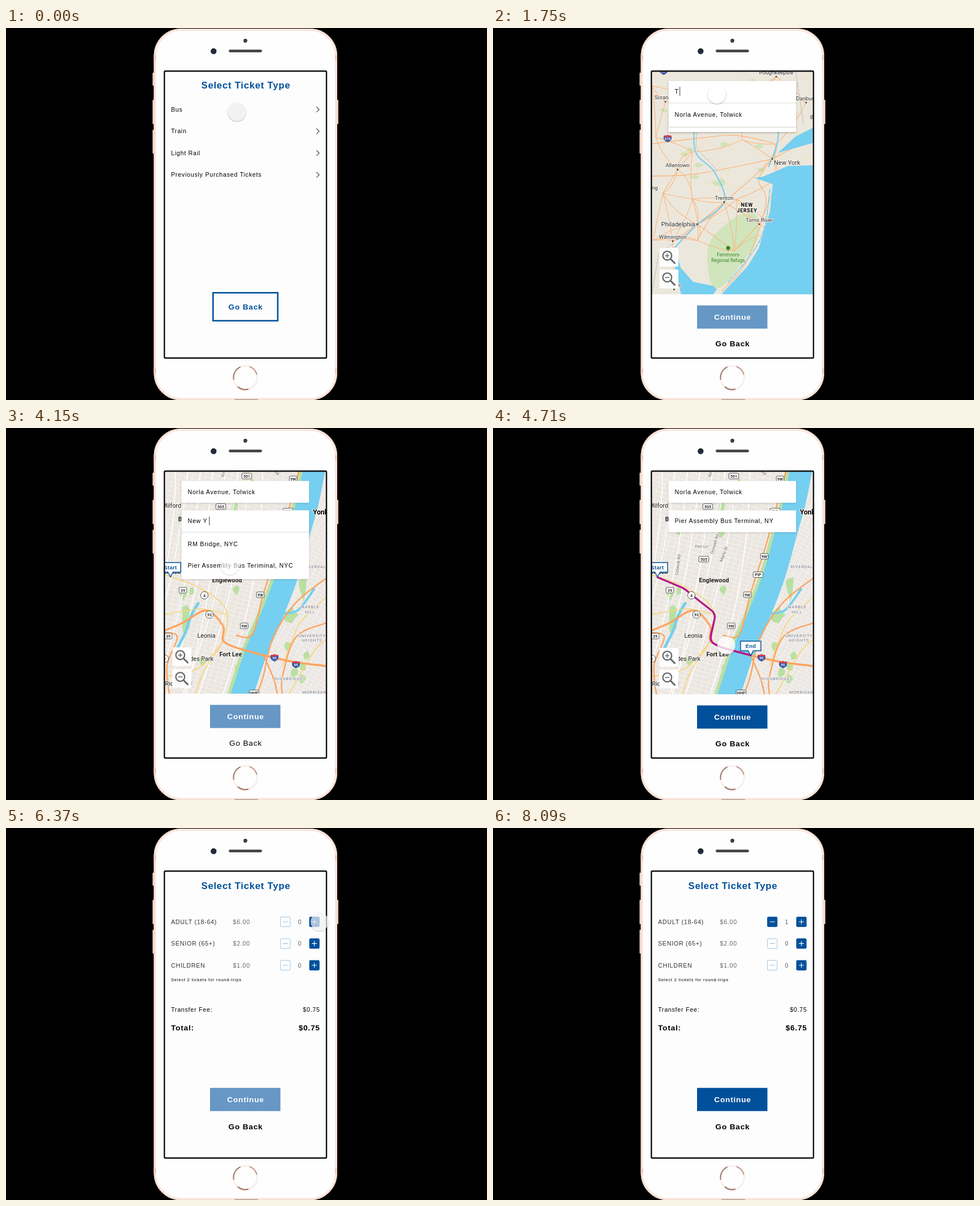
Recreate the animation shown at these times as an HTML page. Size 851 by 658 pixels, loop 8.84 s.

```html
<!DOCTYPE html>
<html lang="en">
<head>
<meta charset="utf-8">
<title>Ticket app</title>
<style>
html, body { margin: 0; height: 100%; overflow: hidden; background: #000; }
svg { display: block; width: 851px; height: 658px; }
text { font-family: "Liberation Sans", Arial, sans-serif; letter-spacing: .76px; white-space: pre; }
.b { font-weight: 700; }
.m { text-anchor: middle; }
.e { text-anchor: end; }
.map text { font-family: Roboto, "Open Sans", sans-serif; letter-spacing: 0; }
.map .halo { paint-order: stroke; stroke: #f6f3ee; stroke-width: 2px; stroke-linejoin: round; }
.map .wide { letter-spacing: .8px; }
.map .ui { font-family: "Liberation Sans", Arial, sans-serif; letter-spacing: .4px; }
.line { fill: none; stroke-linejoin: round; stroke-linecap: round; }
</style>
</head>
<body>
<svg id="stage" viewBox="0 0 851 658"></svg>
<script>
const BLUE = '#00509b', PALE = '#6697c5', WATER = '#75cff0', WHITE = '#fdfdfd', PARK = '#b9e0a2';
const ADDRESS = 'Norla Avenue, Tolwick';

// ---- drawing helpers; text is placed by its vertical centre ----
const text = (x, y, s, size = 10.65, attrs = '') =>
  `<text x="${x}" y="${y + size * .36}" font-size="${size}" ${attrs}>${s}</text>`;
const label = (x, y, s, size = 10, attrs = '', cls = 'm') =>
  text(x, y, s, size, `class="halo ${cls}" ${attrs}`);
const rect = (x, y, w, h, fill, attrs = '') =>
  `<rect x="${x}" y="${y}" width="${w}" height="${h}" fill="${fill}" ${attrs}/>`;
const line = (d, color, width = 1, attrs = '') =>
  `<path class="line" d="${d}" stroke="${color}" stroke-width="${width}" ${attrs}/>`;
const area = (d, fill) => `<path d="${d}Z" fill="${fill}"/>`;
const dot = (x, y, r = 1.3, fill = '#222') => `<circle cx="${x}" cy="${y}" r="${r}" fill="${fill}"/>`;
const group = (id, body, attrs = '') => `<g id="${id}" ${attrs}>${body}</g>`;
const shift = (x, body) => `<g transform="translate(${x})">${body}</g>`;
const title = y => text(424.4, y, 'Select Ticket Type', 16.7, `class="b m" fill="${BLUE}"`);
const goBack = (y, cls = 'b', fill = '#000') => text(424, y, 'Go Back', 13.7, `class="m ${cls}" fill="${fill}"`);
const button = (y, fill) => rect(361, y - 20.5, 124.5, 41, fill) +
  text(424, y, 'Continue', 13.7, 'class="b m" fill="#fff"');
const field = (y, h = 38.5) => rect(310.7, y, 225.4, h, '#fff', 'filter="url(#soft)"');
const cursor = (x, y) => rect(x, y - 8, 1.5, 16, '#777');
const page = body => rect(281, 77, 286, 507, WHITE) + body;

function rng(seed) {
  return () => (seed = (seed * 16807) % 2147483647) / 2147483647;
}

// Smooth curve through a few "x y" points.
function curve(s) {
  const n = s.match(/[\d.]+/g).map(Number);
  const p = n.filter((_, i) => i % 2 === 0).map((x, i) => [x, n[i * 2 + 1]]);
  const at = i => p[Math.max(0, Math.min(p.length - 1, i))];
  const handle = (i, j, k) => at(i).map((v, c) => v + (at(j)[c] - at(k)[c]) / 6);
  return p.slice(1).reduce((d, q, i) =>
    `${d}C${handle(i, i + 1, i - 1)} ${handle(i + 1, i, i + 2)} ${q}`, `M${p[0]}`);
}

// Ragged patch of woodland.
function blob(rand, x, y, rx, ry) {
  let d = '';
  for (let a = 0; a < 6.2; a += .7) {
    const k = .6 + rand() * .6;
    d += `${d ? 'L' : 'M'}${x + Math.cos(a) * rx * k} ${y + Math.sin(a) * ry * k}`;
  }
  return d + 'Z';
}

function zoom(y, plus) {
  return rect(294.5, y, 33.5, 33, '#fff', 'opacity=".95"') +
    `<circle cx="308.3" cy="${y + 13.7}" r="7.8" fill="none" stroke="#666" stroke-width="2.3"/>` +
    line(`M314.5 ${y + 20}l7 7`, '#666', 3) +
    line(`M305 ${y + 13.7}h6.6` + (plus ? 'm-3.3 -3.3v6.6' : ''), '#666', 1.4);
}
const controls = (dy, fill, cls) => rect(281, 470 + dy, 286, 114 - dy, WHITE) +
  zoom(388 + dy, true) + zoom(426.5 + dy) + button(510.2 + dy, fill) + goBack(557 + dy, cls);

// ---- road signs ----
const signText = (x, y, s, size = 7, fill = '#333') =>
  text(x, y, s, size, `class="m" font-weight="700" fill="${fill}"`);
const sign = (x, y, s) => {
  const w = 6 + s.length * 3.8;
  return rect(x - w / 2, y - 5, w, 10, '#fff', 'rx="2" stroke="#444" stroke-width=".9"') + signText(x, y, s);
};
const ring = (x, y, s) =>
  `<circle cx="${x}" cy="${y}" r="6.6" fill="#fff" stroke="#444" stroke-width=".9"/>` + signText(x, y, s);
const highway = (x, y, s) => `<g transform="translate(${x} ${y})">` +
  area('M-6 -5Q-3 -4 0 -6Q3 -4 6 -5Q10 3 0 7Q-10 3 -6 -5', '#3f56a8') +
  area('M-6 -5Q-3 -4 0 -6Q3 -4 6 -5L7 -2H-7', '#d8404a') + signText(0, 1, s, 6, '#fff') + '</g>';
const flag = (x, y, s) =>
  `<path d="M${x - 18} ${y - 26}h36v17h-13.5l-4.5 8.5l-4.5 -8.5h-13.5Z" fill="#fff" stroke="${BLUE}" stroke-width="1.5"/>` +
  text(x, y - 17.5, s, 9.2, `class="b m ui" fill="${BLUE}"`);

// ---- maps ----
function stateMap() {
  const rand = rng(71);
  // Each town: its dot, its name and the side the name stands on.
  const towns = [
    [501, 86, 'Poughkeepsie'], [305, 130.5, 'Scranton'], [554, 132, 'Danbury'], [494, 231.5, 'New York', 'right'],
    [326.5, 250.5, 'Allentown'], [409, 308, 'Trenton'], [471, 347, 'Toms River'],
    [361.5, 347, 'Philadelphia', 'left'], [318, 377, 'Wilmington'], [320.5, 462.5, 'Dover']
  ];
  const names = towns.map(([x, y, s, side]) => dot(x, y) + (
    side === 'right' ? label(x + 3, y + 6.5, s, 11, 'fill="#333"', '') :
    side === 'left' ? label(x - 4, y, s, 11, 'fill="#333"', 'e') : label(x, y - 7.7, s, 9.7, 'fill="#333"')));

  const hubs = towns.map(([x, y]) => [x, y]);
  for (let i = 0; i < 16; i++) hubs.push([281 + (i % 4) * 65 + rand() * 30, 85 + Math.floor(i / 4) * 90 + rand() * 50]);
  let roads = '', minor = '', woods = '';
  hubs.forEach(([x, y], i) => hubs.slice(0, i).forEach(([u, v]) => {
    if (Math.hypot(x - u, y - v) < 92)
      roads += `M${x} ${y}Q${(x + u) / 2 + rand() * 24 - 12} ${(y + v) / 2 + rand() * 24 - 12} ${u} ${v}`;
  }));
  for (let i = 0; i < 75; i++)
    minor += `M${281 + rand() * 280} ${78 + rand() * 390}q${rand() * 20} ${rand() * 16 - 8} ${rand() * 36} ${rand() * 36 - 18}`;
  for (let i = 0; i < 16; i++) woods += blob(rand, 285 + rand() * 200, 80 + rand() * 200, 7, 4);

  return rect(281, 77, 286, 394, '#ece7dc') +
    line(minor, '#f6d9ae', .8) + area(woods + blob(rand, 405, 273, 9, 8), '#cfe3b8') +
    area(curve('433 331 466 330 467 375 438 418 406 457 386 452 379 400 392 366 433 331'), '#d0e5bb') +
    line(roads, '#f9b780', 1.1) +
    line(curve('281 205 372 194 430 190 498 204') + curve('281 262 360 258 494 232') +
      curve('318 377 361 347 409 308 470 255 494 232 566 195') +
      curve('494 232 470 268 483 310 450 410 405 466'), '#f9b780', 1.4) +
    area('M566 243L522 244 478 263 462 265 495 276 490 325 470 390 450 422 403 472H567', WATER) +
    area('M567 176L535 192 504 221 567 203', WATER) +
    area('M322 385L332 424 354 449 389 456 396 462 389 472H333L318 405', WATER) +
    line(curve('505 184 502 208 488 245') + curve('360 132 357 215 392 255 409 308 361 348 323 387'), WATER, 2.2) +
    line(curve('490 285 474 372 416 450'), WATER, 1.6, 'stroke-dasharray="9 3 4 2"') +
    line('M362 132L359 212 397 252M536 78L549 170M281 471L293 400 320 380', '#aaa4b0', .8, 'stroke-dasharray="4 2"') +
    names.join('') + label(281, 283, 'ng', 9.5, 'fill="#333"', '') + label(561, 158, 'B', 9.5, 'fill="#333"', '') +
    ['NEW', 'JERSEY'].map((s, i) => label(449.5, 313 + i * 9.5, s, 8.8, 'font-weight="700"', 'm wide')).join('') +
    dot(416, 389, 3.6, '#3b8527') + line('M416 390v4', '#3b8527', 1.3) +
    ['Fernmoors', 'Regional Refuge'].map((s, i) => text(416, 401.5 + i * 9.5, s, 8.2, 'class="m" fill="#3b8527"')).join('') +
    highway(309, 195, '676') + highway(302, 76, '81');
}

function cityMap() {
  const rand = rng(19);
  const bold = 'font-weight="600"';
  const street = (x, y, s, turn) => label(x, y, s, 7.6, `fill="#666" transform="rotate(${turn} ${x} ${y})"`);
  const district = (x, y, ...rows) =>
    rows.map((s, i) => label(x, y + i * 8.7, s, 7.4, 'fill="#74798f"', 'm wide')).join('');
  const town = (x, y, s, cls = 'm', attrs = '') => label(x, y, s, 10.8, `fill="#222" ${attrs}`, cls);

  const hudson = curve('546 70 534 130 519 184 497 262 467 340 443 395 415 480');
  let parks = blob(rand, 318, 340, 10, 24) + blob(rand, 503, 330, 14, 14) + blob(rand, 525, 280, 8, 24);
  for (let i = 0; i < 12; i++) parks += blob(rand, 285 + rand() * 150, 85 + rand() * 360, 6, 9);
  for (let i = 0; i < 7; i++) parks += blob(rand, 490 + rand() * 70, 370 + rand() * 90, 6, 8);
  let lanes = '';
  for (let i = 0; i < 8; i++) lanes += `M${300 + i * 22} 77q${-rand() * 20} 200 ${-70 - rand() * 30} 394`;

  return rect(281, 77, 286, 394, '#ebe6e0') + rect(281, 77, 286, 394, 'url(#west)') +
    area('M545 77L505 300 438 471H567V77', '#ebe7e3') + area('M545 77L505 300 438 471H567V77', 'url(#east)') +
    area(parks, PARK) + line(lanes, '#fff', 1.6) +
    shift(-6, line(hudson, PARK, 39)) + line(hudson, WATER, 39) +
    line(curve('490 328 517 322 545 285'), WATER, 4) + line(curve('340 310 327 333 318 360 304 388'), WATER, 5) +
    line(curve('281 259 345 284 389 321 384 375 350 430 335 471') + curve('281 440 340 425 384 378') +
      curve('281 330 345 320 392 330') + curve('566 300 520 345 490 420') + curve('500 471 545 395 566 375'), '#f9d478', 1.7) +
    line(curve('281 358 312 345 354 323 384 350 386 378 430 395 500 412 566 421'), '#fca35f', 3.4) +
    line(curve('281 362 303 370 285 420 289 471') + curve('518 77 485 200 455 295 436 365 408 367') +
      curve('566 266 512 310 472 372 455 440 444 471') + curve('566 345 513 370 489 440 489 471') +
      curve('480 471 474 445 456 402'), '#fca35f', 2.4) +
    town(310, 137, 'New Milford', 'e') + town(304.5, 161, 'Bergen', '', bold) + label(543, 149, 'Yonkers', 12, bold, '') +
    town(309, 254.5, 'Tolwick', 'e', bold) + town(391, 269, 'Englewood', 'm', bold) + town(354.5, 367, 'Leonia') +
    town(397.5, 400, 'Fort Lee', 'm', bold) + town(367, 408.5, 'Palisades Park', 'e') + town(281.5, 452, 'Ridgefield', '') +
    district(549, 245, 'RIVERDALE') + district(538, 316.5, 'MARBLE', 'HILL') +
    district(541.5, 367, 'UNIVERSITY', 'HEIGHTS') + district(500, 443.5, 'HIGHBRIDGE') + district(550, 467, 'MORRISANIA') +
    street(369, 209, 'Fen Ln', 0) + street(392, 205, 'Dorwell Rd', -74) + street(408, 223, 'Marlo St', -70) +
    street(327, 242, 'Colwick Rd', -83) + street(384, 82, 'Kn', -75) + street(479, 79, 'Rd', 40) +
    group('route', line('M291 264L336 283Q343 287 350 294L387 323Q394 329 392 338L386 364Q383 378 392 382Q400 387 410 390L456 402', '#b5168c', 3.4)) +
    sign(426, 85, '501') + sign(380, 139, '505') + sign(373, 232, '505') + sign(313, 287, '39') + sign(287, 368, '39') +
    sign(469, 259.5, 'PIP') + sign(499, 147, 'PIP') + sign(439, 468.5, 'HHP') +
    sign(508, 90, '9W') + sign(480, 227, '9W') + sign(450, 295, '9W') + sign(421.5, 350, '9W') +
    ring(351, 296, '4') + ring(360, 330, '93') + ring(281, 408, '1') +
    highway(475, 406, '95') + highway(513, 418, '95') +
    flag(291, 264, 'Start') + group('end', flag(456, 403, 'End'));
}

// ---- screens ----
function listScreen() {
  const rows = ['Bus', 'Train', 'Light Rail', 'Previously Purchased Tickets'];
  return page(title(100.5) + rows.map((s, i) => {
    const y = 144 + i * 38.5;
    return text(292, y, s) + line(`M549.5 ${y - 4.2}l4.6 4.4l-4.6 4.4`, '#555', 1.3);
  }).join('') + rect(366.3, 468.3, 114.5, 49.5, 'none', `stroke="${BLUE}" stroke-width="2.6"`) + goBack(493, 'b', BLUE));
}

const hint = (y, s) => text(321.5, y, s, 10.65, 'fill="#666"');

const fromScreen = () => page(`<g class="map">${stateMap()}</g>` + controls(1, PALE, 'b') +
  field(93.7) + field(145.7) + hint(112.5, 'From:') + hint(164.5, 'To:') +
  group('fromMenu', field(93.7, 90) + rect(311, 132.3, 225, 1, '#e2ddd0') + rect(311, 174.8, 225, 1.4, '#dedacf') +
    text(321.5, 112.5, 'T') + cursor(329.8, 112) + text(321.5, 153, ADDRESS)));

const toScreen = () => page(`<g class="map">${cityMap()}</g>` +
  group('waiting', controls(0, PALE, '')) + group('ready', controls(1, BLUE, 'b')) +
  field(93.7) + text(321.5, 112.7, ADDRESS) + field(145.7) + group('toHint', hint(164.5, 'To:')) +
  group('toMenu', field(145.7, 121.5) + rect(311, 183.7, 225, 1, '#d5dde2') +
    text(321.5, 164.5, 'New Y') + cursor(359, 164.5) + text(321.5, 205, 'RM Bridge, NYC') +
    text(321.5, 243.5, 'Pier Assembly Bus Teriminal, NYC')) +
  group('toDone', text(321.5, 164.5, 'Pier Assembly Bus Terminal, NY')));

const stepper = (x, y, plus, on) =>
  rect(x - 8.6, y - 8.6, 17.2, 17.2, on ? BLUE : '#fff', `rx="1.5" stroke="${on ? BLUE : '#9cc3e4'}"`) +
  line(`M${x - 4} ${y}h8` + (plus ? 'm-4 -4v8' : ''), on ? '#fff' : '#9cc3e4', 1.1);
const count = (y, s) => text(519.9, y, s, 10.65, 'class="m" fill="#666"');
const total = s => text(555.7, 353.5, s, 13.7, 'class="b e"');

function fareScreen() {
  const fares = [['ADULT (18-64)', '$6.00'], ['SENIOR (65+)', '$2.00'], ['CHILDREN', '$1.00']];
  const order = (id, n, sum, fill) =>
    group(id, stepper(494.2, 166, false, n > 0) + count(166, n) + total(sum) + button(480.2, fill));
  return page(title(101.5) + fares.map(([who, price], i) => {
    const y = 166 + i * 38.4;
    return text(292, y, who, 10.65, 'fill="#333"') + text(401.5, y, price, 10.65, 'fill="#666"') +
      stepper(545.6, y, true, true) + (i ? stepper(494.2, y) + count(y, 0) : '');
  }).join('') + text(292, 268.7, 'Select 2 tickets for round-trips', 7.6) +
    text(292, 321, 'Transfer Fee:') + text(555.7, 321, '$0.75', 10.65, 'class="e"') +
    text(292, 353.5, 'Total:', 13.7, 'class="b"') + goBack(528) +
    order('none', 0, '$0.75', PALE) + order('one', 1, '$6.75', BLUE));
}

function phone() {
  const key = (x, y, h) => rect(x, y, 3, h, '#f1cfbf', 'rx="1"');
  const arc = (from, size, color) =>
    `<circle cx="423.5" cy="618.5" r="21" fill="none" stroke="${color}" stroke-width="2.2" pathLength="360" stroke-dasharray="${size} 360" transform="rotate(${from} 423.5 618.5)"/>`;
  let bands = '';
  for (const x of [261.5, 582]) for (const y of [48, 602]) bands += rect(x, y, 4, 9, '#eccbbb');
  return key(259.3, 79, 23) + key(259.3, 127, 43) + key(259.3, 180, 42) + key(585, 127, 43) +
    rect(263.5, 3, 320.5, 653.5, '#fefefe', 'rx="46" stroke="#fae5dc" stroke-width="4"') +
    rect(262, 1.5, 323.5, 656.5, 'none', 'rx="47.5" stroke="#f3d3c5" stroke-width=".8"') + bands +
    dot(423.5, 22.5, 3.4, '#3b3b3d') + dot(367.3, 41, 5.2, '#26282e') + dot(367.3, 41, 2.8, '#1c2b52') +
    rect(394, 38.2, 59, 4.8, '#454547', 'rx="2.4"') + rect(404, 656.5, 42, 2, '#b59a8d') +
    arc(0, 360, '#f5ebe6') + arc(170, 75, '#a9826f') + arc(290, 55, '#c29c89') + arc(75, 55, '#a07662');
}

const grid = (id, w, h, turn) =>
  `<pattern id="${id}" width="${w}" height="${h}" patternUnits="userSpaceOnUse" patternTransform="rotate(${turn})">
  <path d="M0 0H${w}M0 0V${h}" stroke="#f9f7f5" stroke-width="1.4"/></pattern>`;

const stage = document.getElementById('stage');
stage.innerHTML = `<defs>
  <filter id="soft" x="-10%" y="-20%" width="120%" height="150%"><feDropShadow dx="0" dy="1" stdDeviation="1.6" flood-opacity=".22"/></filter>
  <filter id="lift" x="-30%" y="-30%" width="160%" height="160%"><feDropShadow dx="0" dy="1" stdDeviation="1" flood-opacity=".35"/></filter>
  <clipPath id="glass"><rect x="281" y="77" width="285.5" height="507"/></clipPath>
  ${grid('west', 11, 8, 15)}${grid('east', 10, 7, 28)}</defs>` +
  rect(0, 0, 851, 658, '#000') + phone() +
  `<g clip-path="url(#glass)">${listScreen()}${group('from', fromScreen())}${group('to', toScreen())}${group('fare', fareScreen())}</g>` +
  rect(280.2, 76.2, 286.8, 507.6, 'none', 'rx="1.5" stroke="#111" stroke-width="2.4"') +
  group('touch', '<circle r="16" filter="url(#lift)"/>');

// ---- motion ----
const LOOP = 8840, TICK = 140;
// start and end time, then where the touch arrives: x, y, opacity
const moves = [
  [1070, 1190, 396, 140, 1], [1470, 1750, 396, 117.5, 1], [2060, 2480, 394, 145, .85],
  [2750, 2900, 395, 168.5, 1], [3730, 4150, 396, 243.5, .6], [4560, 5110, 438, 596, 1],
  [5240, 5510, 435, 515.5, .4], [5660, 6090, 561, 195, 1], [6370, 6370, 555, 166, .7],
  [6520, 7400, 546, 173, 1], [7680, 8090, 831, 750, 0]
];

// Progress from 0 to 1 in n even jumps, the first at a and the last at b.
function steps(t, a, b, n = Math.round((b - a) / TICK) + 1) {
  if (t < a) return 0;
  if (t >= b) return 1;
  return (Math.floor((t - a) / (b - a) * (n - 1)) + 1) / n;
}
const show = (id, v) => document.getElementById(id).setAttribute('opacity', v);

function draw(t) {
  let pose = [408.3, 148.3, 1];
  for (const [a, b, ...goal] of moves) {
    const p = steps(t, a, b);
    pose = pose.map((v, i) => v + (goal[i] - v) * p);
  }
  const touch = document.getElementById('touch');
  touch.setAttribute('transform', `translate(${pose[0]} ${pose[1]})`);
  touch.setAttribute('fill', t >= 1470 && t < 6370 ? '#fff' : '#f2f2f2');
  show('touch', pose[2]);

  const routed = t >= 4280 ? 1 : 0, menu = steps(t, 3180, 3330), paid = steps(t, 6520, 6810);
  show('from', steps(t, 150, 410, 2));
  show('fromMenu', steps(t, 1470, 1750));
  show('to', steps(t, 2340, 2480));
  show('toHint', routed ? 0 : 1 - menu);
  show('toMenu', routed ? 0 : menu);
  for (const id of ['toDone', 'route', 'end', 'ready']) show(id, routed);
  show('waiting', 1 - routed);
  show('fare', steps(t, 5803, 6090));
  show('none', 1 - paid);
  show('one', paid);
}

const began = performance.now();
function tick() {
  draw((performance.now() - began) % LOOP);
  requestAnimationFrame(tick);
}
tick();
</script>
</body>
</html>
```
